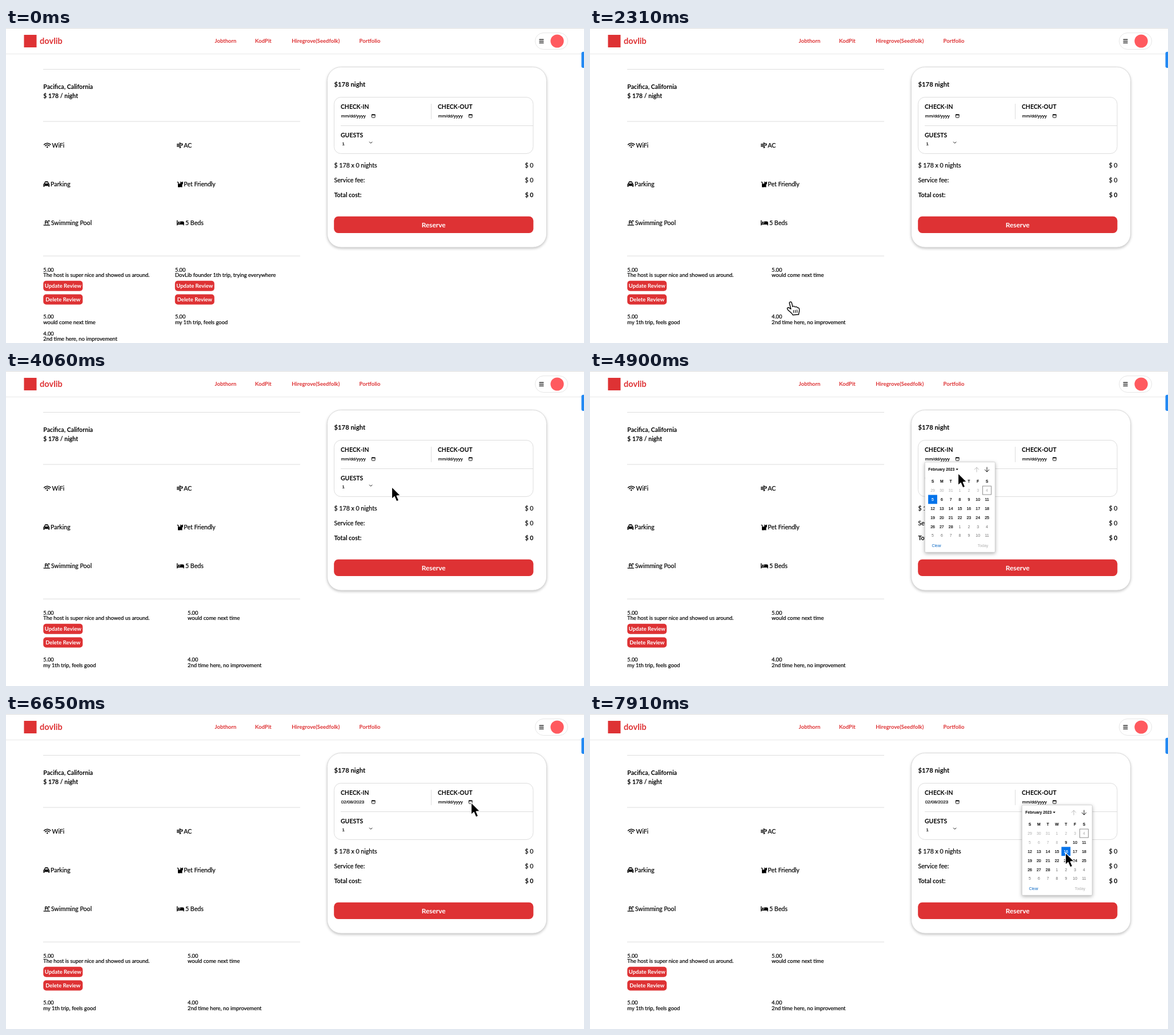
Recreate the animation shown at these times as an HTML page. Size 1012 px wide and 553 px high, loop 8000 ms.

```html
<!DOCTYPE html>
<html lang="en">
<head>
<meta charset="utf-8">
<title>Stay booking</title>
<style>
html, body { margin: 0; width: 100%; height: 100%; overflow: hidden; background: #fff; }
svg { display: block; width: 100%; height: 100%; font-family: Lato, "Open Sans", sans-serif; fill: #000; }
.arial { font-family: "Liberation Sans", Arial, sans-serif; }
.body, .field { stroke: #000; stroke-width: .2; }
.line { fill: none; stroke: #ddd; }
.ink { fill: none; stroke: #000; stroke-width: 1.2; stroke-linecap: round; stroke-linejoin: round; }
.card { fill: #fff; stroke: #d8d8d8; filter: drop-shadow(0 2px 2px rgba(0,0,0,.22)); }
.popup { fill: #fff; stroke: #c4c4c4; stroke-width: .7; filter: drop-shadow(0 2px 3px rgba(0,0,0,.3)); }
</style>
</head>
<body>
<svg id="stage" viewBox="0 0 1012 553" xmlns="http://www.w3.org/2000/svg"></svg>
<script>
const LOOP = 8000, STEP = 70;
const RED = '#de3234', BLUE = '#0473ea';

const text = (x, y, size, str, o = {}) =>
  `<text x="${x}" y="${y}" font-size="${size}" font-weight="${o.w || 400}" fill="${o.fill || '#000'}"` +
  ` text-anchor="${o.at || 'start'}" class="${o.cls || (o.w ? '' : 'body')}"${o.extra || ''}>${str}</text>`;
const bold = (x, y, size, str, o = {}) => text(x, y, size, str, { w: 700, ...o });
const rect = (x, y, w, h, r, attrs) =>
  `<rect x="${x}" y="${y}" width="${w}" height="${h}" rx="${r}" ${attrs}/>`;
const path = (d, attrs = 'class="ink"') => `<path d="${d}" ${attrs}/>`;
const group = (id, body, attrs = '') => `<g id="${id}" ${attrs}>${body}</g>`;
const at = (x, y, body) => `<g transform="translate(${x} ${y})">${body}</g>`;

function header() {
  const links = [[384.5, 'Jobthorn'], [450.5, 'KodPit'], [542.3, 'Hiregrove(Seedfolk)'], [637, 'Portfolio']];
  return path('M0 .5H1012', 'class="line"') + path('M0 45.5H1012', 'class="line" style="stroke:#e8e8e8"') +
    rect(31.5, 12, 22, 22, 0, `fill="${RED}"`) +
    bold(59, 28, 14.6, 'dovlib', { fill: RED }) +
    links.map(([x, s]) => bold(x, 26.4, 9.5, s, { fill: RED, at: 'middle' })).join('') +
    rect(926.5, 8.5, 57, 29, 14.5, 'class="line" style="stroke:#e6e6e6"') +
    path('M934 20.2H941M934 23.2H941M934 26.2H941') +
    `<circle cx="965" cy="23" r="11.6" fill="#ff5a5f"/>` +
    rect(1007.5, 41.7, 8, 28.3, 3, 'fill="#2188f3"');
}

const icons = {
  wifi: path('M.6 3.6Q6.3-1.2 12 3.6M2.6 5.8Q6.3 2.8 10 5.8', 'class="ink" style="stroke-width:1.5"') +
    '<circle cx="6.3" cy="8" r="1.3"/>',
  wind: path('M.6 3.2H5.4C7.4 3 6.6.4 4.9 1.1M.6 5.2H8.8C11 4.8 10 1.6 8 2.6M.6 7.2H5.6C7.6 7.6 6.6 10.2 4.9 9.2',
    'class="ink" style="stroke-width:1.4"'),
  car: path('M0 5.4Q0 4 1.2 3.8L2.3 1Q2.6 0 3.7 0H7Q8.1 0 8.4 1L9.5 3.8Q10.7 4 10.7 5.4V9.4H8.8V8H1.9V9.4H0Z' +
    'M2.7 3.8H8L7.3 1.6H3.4Z', 'fill-rule="evenodd"') +
    '<g fill="#fff"><circle cx="2.1" cy="5.8" r=".7"/><circle cx="8.6" cy="5.8" r=".7"/></g>',
  cat: path('M.7 1.4Q2.2 1.4 2.2 3V8.6', 'class="ink" style="stroke-width:1.4"') +
    path('M1.5 10.4V8Q1.6 4 5.8 3.9V.2L7.3 1.6H8.9L10.4.2V3.8Q10.4 5.4 9 6V10.4H7.8L4.6 9.4H6V10.4Z', ''),
  pool: path('M3.2 7V2.2Q3.2.8 4.6.8T6 2M8 7V2.2Q8 .8 9.4.8T10.8 2M3.2 3.8H8' +
    'M.5 8.7Q2 9.5 3.2 8.5Q4.6 9.6 6 8.5Q7.4 9.6 8.6 8.5Q10 9.5 11.2 8.7'),
  bed: path('M0 0H1.4V5.6H5.8V2H10.6Q12.8 2 12.8 4.2V9H11.4V7.4H1.4V9H0Z', '') + '<circle cx="3.6" cy="3.6" r="1.5"/>'
};

function details() {
  const perks = [
    [66, 201, 'wifi', 80.5, 209.7, 'WiFi'], [299, 200.7, 'wind', 311.3, 209.7, 'AC'],
    [65.5, 269.3, 'car', 78, 277.9, 'Parking'], [299.5, 269, 'cat', 311.3, 277.9, 'Pet Friendly'],
    [65.5, 337.3, 'pool', 79, 346, 'Swimming Pool'], [299, 337.6, 'bed', 314, 346, '5 Beds']
  ];
  return path('M65 72.5H515M65 164H515M65 400.2H515', 'class="line"') +
    bold(65.3, 106.8, 10.6, 'Pacifica, California') + bold(65.3, 122.6, 10.5, '$ 178 / night') +
    perks.map(([ix, iy, name, x, y, s]) => at(ix, iy, icons[name]) + text(x, y, 10.6, s)).join('');
}

const review = (x, y, score, note) => text(x, y, 9.3, score) + text(x, y + 9.2, 9.4, note);
const pill = (x, y, s) => rect(x, y, 69, 18, 5, `fill="${RED}"`) +
  bold(x + 34.5, y + 12.3, 9.5, s, { fill: '#fff', at: 'middle' });
const buttons = x => pill(x, 443.8, 'Update Review') + pill(x, 467.5, 'Delete Review');

function reviews() {
  const first = review(65.3, 428, '5.00', 'The host is super nice and showed us around.') + buttons(65.3);
  const next = 'would come next time', good = 'my 1th trip, feels good', again = '2nd time here, no improvement';
  return first +
    group('before', review(296, 428, '5.00', 'DovLib founder 1th trip, trying everywhere') + buttons(295.8) +
      review(65.3, 510.4, '5.00', next) + review(296, 510.4, '5.00', good) + review(65.3, 539.7, '4.00', again)) +
    group('after', review(318, 428, '5.00', next) + review(65.3, 510.4, '5.00', good) +
      review(318, 510.4, '4.00', again));
}

function booking() {
  const dateField = (x, id) => text(x, 157, 8.1, 'mm/dd/yyyy', { cls: 'arial field', extra: ` id="${id}"` }) +
    rect(x + 53.8, 151.9, 5.6, 5.4, .8, 'class="ink" style="stroke-width:.9"') +
    path(`M${x + 53.8} 152.4h5.6`, 'class="ink" style="stroke-width:1.5"');
  const row = (y, label, w) => text(574.5, y, 10.6, label, { w }) + text(923.5, y, 10.6, '$ 0', { w, at: 'end' });
  return rect(562.5, 68.5, 384, 316.5, 24, 'class="card"') +
    bold(574.5, 103, 11.3, '$178 night') +
    rect(574.5, 121.5, 348.5, 99, 12, 'class="line"') +
    path('M744.5 133V160M586 171.5H923', 'class="line"') +
    bold(586, 141.7, 10.4, 'CHECK-IN') + bold(756, 141.7, 10.4, 'CHECK-OUT') +
    dateField(586.7, 'checkIn') + dateField(756.7, 'checkOut') +
    bold(586, 191.7, 10.5, 'GUESTS') + text(588.4, 206.3, 7.8, '1', { cls: 'arial field' }) +
    path('M636.4 200l2.3 2.3 2.3-2.3', 'class="ink" style="stroke-width:.9"') +
    row(245, '$ 178 x 0 nights') + row(271, 'Service fee:') + row(297.2, 'Total cost:', 700) +
    rect(574.2, 330.7, 349.2, 29.3, 7.5, `fill="${RED}"`) +
    bold(748.7, 349.5, 11.9, 'Reserve', { fill: '#fff', at: 'middle' });
}

// Month popup; days before `min` are disabled
function calendar(x, min, chosen) {
  const cell = i => [x + 14 + (i % 7) * 15.83, 209.9 + Math.floor(i / 7) * 15.8];
  const label = (s, cx, y, o) => text(cx, y, 6.9, s, { cls: 'arial', at: 'middle', ...o });
  let out = rect(x + .3, 159.8, 123, 158.5, 1.5, 'class="popup"') +
    text(x + 6.3, 175, 6.8, 'February 2023', { cls: 'arial', w: 700 }) +
    path(`M${x + 54.6} 171.5h4.2l-2.1 2.7z`, '') +
    path(`M${x + 91} 177.2v-8m-3.7 3.7l3.7-3.7 3.7 3.7`, 'class="ink" style="stroke:#b5b5b5;stroke-width:.9"') +
    path(`M${x + 109} 169v8m-3.7-3.7l3.7 3.7 3.7-3.7`, 'class="ink" style="stroke-width:.9"');
  [...'SMTWTFS'].forEach((d, i) => out += label(d, cell(i)[0], 195.9, { w: 700 }));
  for (let i = 0; i < 42; i++) {
    const [cx, cy] = cell(i), day = i - 2, n = new Date(2023, 1, day).getDate();
    const picked = day === chosen;
    if (picked) out += rect(cx - 7.9, cy - 8.2, 15.8, 15.8, 0, `fill="${BLUE}"`);
    if (day === 4) out += rect(cx - 7.5, cy - 7.9, 15, 15, 0, 'fill="none" stroke="#858585" stroke-width=".9"');
    const fill = picked ? '#fff' : day < min ? '#adadad' : day > 28 ? '#6e6e6e' : '#000';
    const heavy = day >= min && day <= 28;
    out += label(n, cx, cy + 2.5, { fill, extra: heavy ? ` stroke="${fill}" stroke-width=".18"` : '' });
  }
  return out + label('Clear', x + 20.8, 308.6, { fill: '#0a68c4' }) +
    label('Today', x + 102, 308.6, { fill: '#b0b0b0' });
}

const arrow = path('M0 0V21L4.7 16.8L8.3 25.3L12.2 23.6L8.7 15.4L15 15Z',
  'transform="translate(-.5 -.4)" fill="#000" stroke="#fff" stroke-width="1.2" stroke-linejoin="round"');
const hand = path('M-1.9 2C-2.2-.6 1.5-1 2.2 1.5L3.8 8.2C5 6.8 7.4 7.3 8 8.9C9.5 7.8 11.4 8.4 12 10C14 9.4 15.4 11 15.5 13' +
  'C16 17 14.3 18.5 14.4 22L4 22.8C2.5 19-2.6 16.5-5.3 12.8C-6.6 10.4-4 8.8-2 10.4L.8 12.4Z',
  'fill="#fff" stroke="#000" stroke-width="1.4" stroke-linejoin="round"') +
  path('M5.2 14.5L5.8 19M8.3 14.2L8.8 18.8M11.3 13.8L11.7 18.4', 'class="ink" style="stroke-width:1.1"');

const stage = document.getElementById('stage');
stage.innerHTML = header() + details() + reviews() + booking() +
  group('inOpen', calendar(586, 5, 5)) + group('inPicked', calendar(586, 5, 8)) +
  group('outOpen', calendar(756, 9, 9)) + group('outPicked', calendar(756, 9, 16)) +
  group('cursor', group('arrow', arrow) + group('hand', hand) +
    '<circle id="ring" cx="-3.5" cy="-2" r="31.3" fill="none" stroke="#222" stroke-width="1.1"/>');

const el = {};
stage.querySelectorAll('[id]').forEach(n => el[n.id] = n);

// time, x, y of the pointer tip
const track = [
  [70, 306, 546], [210, 322, 508], [350, 322, 508], [1050, 352, 480], [1470, 352, 480],
  [1540, 346, 473], [1680, 351, 481], [2660, 351, 481], [2800, 398, 452], [2940, 398, 452],
  [3150, 678, 360], [3220, 678, 360], [3360, 716, 352], [3640, 738, 300], [3780, 738, 300],
  [4200, 645, 156], [4830, 645, 156], [4900, 645, 180], [5180, 620, 208], [5460, 645, 223],
  [5810, 645, 223], [5880, 688, 208], [6020, 755, 186], [6650, 815, 156], [7000, 815, 156],
  [7280, 811, 236], [7700, 833, 244], [LOOP, 833, 244]
];

function pointer(t) {
  const i = Math.max(1, track.findIndex(k => k[0] >= t));
  const [t0, x0, y0] = track[i - 1], [t1, x1, y1] = track[i];
  const p = Math.max(0, (t - t0) / (t1 - t0));
  return [x0 + (x1 - x0) * p, y0 + (y1 - y0) * p];
}

const show = (id, on) => el[id].style.display = on ? '' : 'none';

function draw(time) {
  const t = Math.floor((time % LOOP) / STEP) * STEP;
  const during = (a, b) => t >= a && t < b;
  const [x, y] = pointer(t);
  const onReserve = x > 574 && x < 923 && y > 331 && y < 360;
  const isHand = during(1540, 2730) || onReserve;

  show('before', t < 2030);
  show('after', t >= 2030);
  show('inOpen', during(4480, 5740));
  show('inPicked', during(5740, 5880));
  show('outOpen', during(6790, 7910));
  show('outPicked', t >= 7910);
  el.checkIn.textContent = t < 5880 ? 'mm/dd/yyyy' : '02/08/2023';

  show('cursor', t >= 70);
  show('arrow', !isHand);
  show('hand', isHand);
  show('ring', during(1330, 1400) || during(4340, 4410) || during(5600, 5740) ||
    during(6720, 6790) || during(7770, 7910));
  el.cursor.setAttribute('transform', `translate(${x.toFixed(2)} ${y.toFixed(2)})`);
}

const start = performance.now();
function tick() {
  draw(performance.now() - start);
  requestAnimationFrame(tick);
}
draw(0);
requestAnimationFrame(tick);
</script>
</body>
</html>
```
